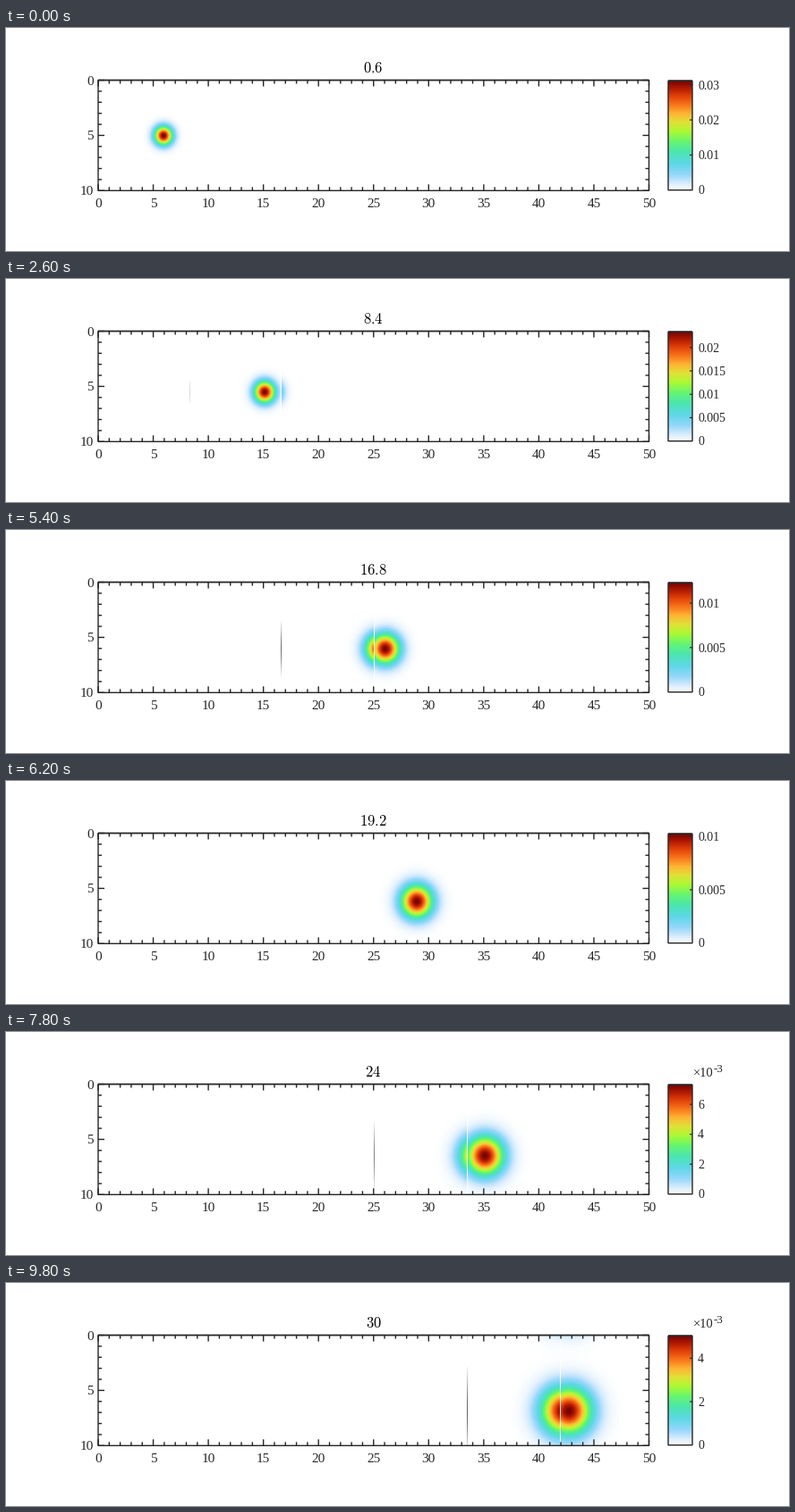
Recreate the animation shown at these times as a matplotlib script. Size 875x250 px, loop 10000 ms.

```python
import numpy as np
import matplotlib.pyplot as plt
from matplotlib.animation import FuncAnimation
from matplotlib.colors import LinearSegmentedColormap

W, H, DPI = 875, 250, 100
PX = 72 / DPI
FRAMES, INTERVAL, DT = 50, 200, 0.6
INK = "#262626"

# plot box and colour bar, in pixels
L, R, T, B = 103, 718.5, 58.5, 182.3
CL, CR, CT, CB = 740, 767, 59.3, 181.7
UX, UY = (R - L) / 50, (B - T) / 10
SEAMS = np.array([205.5, 307.5, 411.5, 515.5, 619.5])

STOPS = [
    (0, "#ffffff"), (.06, "#d7ecfd"), (.14, "#96d7fa"), (.24, "#5fd7e8"),
    (.35, "#4be6af"), (.45, "#66f570"), (.53, "#aafa34"), (.62, "#e1e137"),
    (.70, "#feb434"), (.78, "#f8761c"), (.86, "#e2420a"), (.93, "#b41b03"),
    (1, "#760403"),
]
cmap = LinearSegmentedColormap.from_list("pale_jet", STOPS, N=512)

fig = plt.figure(figsize=(W / DPI, H / DPI), dpi=DPI, facecolor="white")
ax = fig.add_axes([0, 0, 1, 1])
ax.axis("off")


def line(xs, ys, width=1.4):
    return ax.plot(xs, ys, color=INK, lw=width * PX, zorder=3, snap=False,
                   solid_capstyle="butt", solid_joinstyle="miter")[0]


def box(x0, x1, y0, y1):
    line([x0, x1, x1, x0, x0, x1], [y0, y0, y1, y1, y0, y0])


def label(x, y, s, size, ha="center", color=INK, **kw):
    kw.setdefault("family", "Liberation Serif")
    return ax.text(x, y, s, fontsize=size * PX, color=color, ha=ha,
                   va="baseline", zorder=4, **kw)


cols = np.arange(103, 719) + 0.5
rows = np.arange(58, 183)[:, None] + 0.5
part = np.searchsorted(SEAMS, cols)
field = ax.imshow(np.ones((rows.size, cols.size, 3)), extent=(103, 719, 183, 58),
                  aspect="auto", interpolation="nearest", zorder=1)
ax.imshow(cmap(np.linspace(1, 0, 122))[:, None, :3], extent=(CL, CR, CB, CT),
          aspect="auto", interpolation="nearest", zorder=1)
ax.set_xlim(0, W)
ax.set_ylim(H, 0)

box(L, R, T, B)
box(CL, CR, CT, CB)
for i in range(51):
    x, n = L + i * UX, 4 if i % 5 else 7
    line([x, x], [T, T + n])
    line([x, x], [B, B - n])
    if i % 5 == 0:
        label(x, 201, str(i), 15.2)
for i in range(11):
    y, n = T + i * UY, 4 if i % 5 else 7
    line([L, L + n], [y, y])
    line([R, R - n], [y, y])
    if i % 5 == 0:
        label(98, y + 5, str(i), 15.2, "right")

title = label(410.5, 50, "", 16.5, color="black", math_fontfamily="cm")
bar_ticks = [line([CR - 3, CR], [0, 0], 1.2) for _ in range(6)]
bar_labels = [label(773, 0, "", 13.9, "left") for _ in range(6)]
power = [label(768, 50, "×10", 14.5, "left"), label(791, 45, "-3", 13, "left")]


def peak(t):
    return 1 / (32.3 - 0.415 * t + 0.199 * t * t)


def bell(d, s):
    return np.exp(-0.5 * (d / s) ** 2)


def pulse(t):
    """Colours of the spreading pulse, solved piecewise between the seams."""
    sx = np.sqrt(1.52 / peak(t))
    sy = 1.04 * sx
    start = 160 + 5.6 * np.arange(6)
    start[0] = 161 + 6.2 * np.exp(-(t - DT) / 3)
    cx = start + 14.7 * t
    cy = T + UY * (4.98 + 0.0625 * t)

    # the pulse re-enters at the top as it leaves at the bottom
    tall = bell(rows - cy, sy) + 0.7 * bell(rows - cy + 10 * UY, sy)
    rgb = cmap(tall * bell(cols - cx[part], sx))[..., :3]

    for k, seam in enumerate(SEAMS):
        c = int(seam) - 103
        rgb[:, c] += 0.85 * (1 - rgb[:, c])
        # the end of each piece echoes as a dark line at its start
        if k + 1 < len(SEAMS):
            echo = tall * bell(SEAMS[k + 1] - cx[k + 1], sx)
            rgb[:, c] *= 1 - 0.62 * np.sqrt(np.clip(echo - 0.02, 0, 1))
    return rgb


def draw(i):
    t = (i + 1) * DT
    p = peak(t)
    field.set_data(pulse(t))
    title.set_text(f"${t:.3g}$")

    step = next(s for s in (0.002, 0.005, 0.01) if p / s <= 5)
    small = p < 0.01
    for j, (tick, text) in enumerate(zip(bar_ticks, bar_labels)):
        v = j * step
        y = CB - (CB - CT) * v / p
        shown = v <= p
        tick.set_ydata([y, y])
        tick.set_visible(shown and j > 0)
        text.set_y(y + 4.8)
        text.set_text(f"{v * 1000 if small else v:g}")
        text.set_visible(shown)
    for text in power:
        text.set_visible(small)
    return [field, title, *bar_ticks, *bar_labels, *power]


anim = FuncAnimation(fig, draw, frames=FRAMES, interval=INTERVAL,
                     init_func=lambda: draw(0), repeat=True, repeat_delay=0)
plt.show()
```
